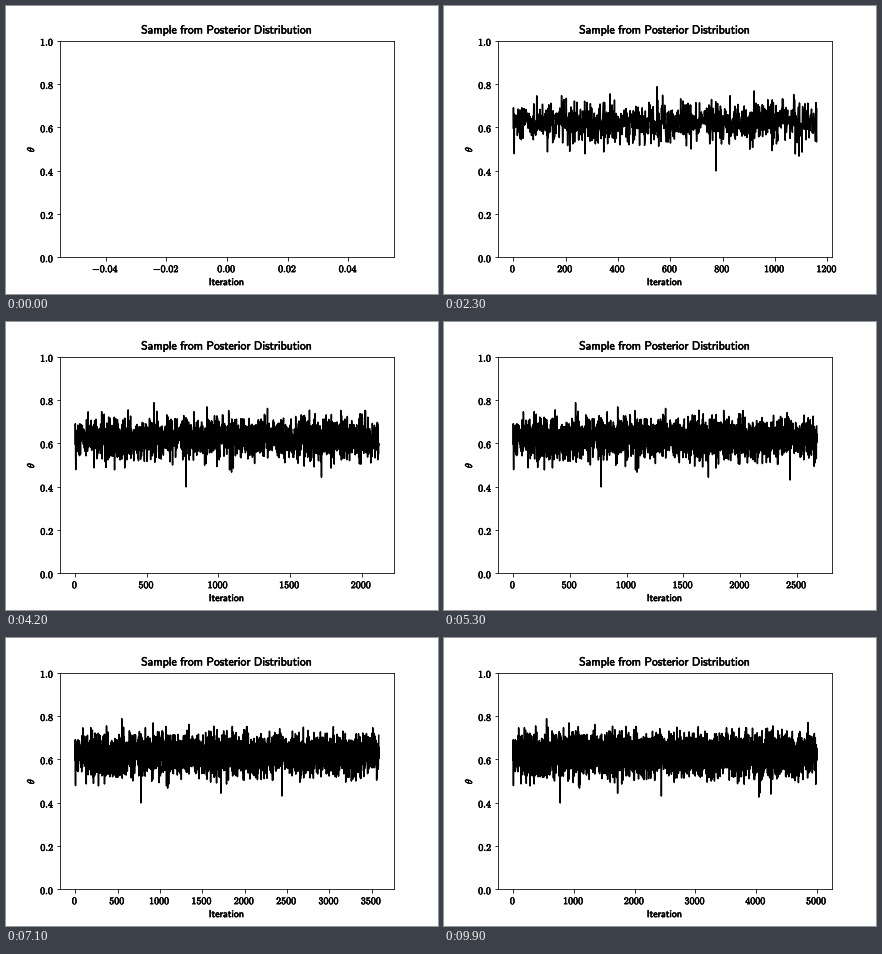
Write a matplotlib script that moves like this. It is 432x288 px and loops after 10000 ms.

```python
import matplotlib.pyplot as plt
import numpy as np
from matplotlib.animation import FuncAnimation
from matplotlib.patheffects import withStroke

FRAMES = 100
DRAWS = 5000

plt.rcParams.update({
    "mathtext.fontset": "cm",
    "font.size": 10,
    "figure.subplot.left": 0.125,
    "figure.subplot.right": 0.898,
    "figure.subplot.bottom": 0.128,
    "figure.subplot.top": 0.88,
    "xtick.major.pad": 1.5,
    "ytick.major.pad": 2,
})

# The chain's most extreme excursions: iteration -> value
OUTLIERS = {4: 0.478, 550: 0.787, 775: 0.398, 1720: 0.443, 2440: 0.43, 4045: 0.425}


def make_chain():
    rng = np.random.default_rng(12)
    chain = rng.beta(66, 40, DRAWS)
    chain[list(OUTLIERS)] = list(OUTLIERS.values())
    return chain


def sans(text):
    return r"$\mathsf{" + text.replace(" ", r"\ ") + "}$"


def roman(text):
    return rf"$\mathrm{{{text}}}$"


def x_label(x, pos):
    if ax.get_xlim()[1] < 1:
        return roman(f"{round(x, 2) + 0.0:.2f}")
    return roman(f"{round(x)}")


def thicken(*texts):
    for text in texts:
        text.set_path_effects([withStroke(linewidth=0.55, foreground="black")])


theta = make_chain()
counts = np.linspace(0, DRAWS, FRAMES).astype(int)

fig, ax = plt.subplots(figsize=(6, 4), dpi=72)
line, = ax.plot([], [], color="black", lw=1.5)
ax.set_ylim(0, 1)
ax.xaxis.set_major_formatter(x_label)
ax.yaxis.set_major_formatter(lambda y, pos: roman(f"{y:.1f}"))
thicken(
    ax.set_title(sans("Sample from Posterior Distribution"), fontsize=11.75, pad=7),
    ax.set_xlabel(sans("Iteration"), labelpad=1),
    ax.set_ylabel(r"$\theta$"),
)


def update(i):
    n = counts[i]
    line.set_data(np.arange(n), theta[:n])
    last = max(n - 1, 0)
    margin = 0.05 * last or 0.055
    ax.set_xlim(-margin, last + margin)
    thicken(*ax.get_xticklabels(), *ax.get_yticklabels())
    return line,


anim = FuncAnimation(fig, update, frames=FRAMES, interval=100,
                     repeat=True, repeat_delay=0, blit=False)
plt.show()
```
